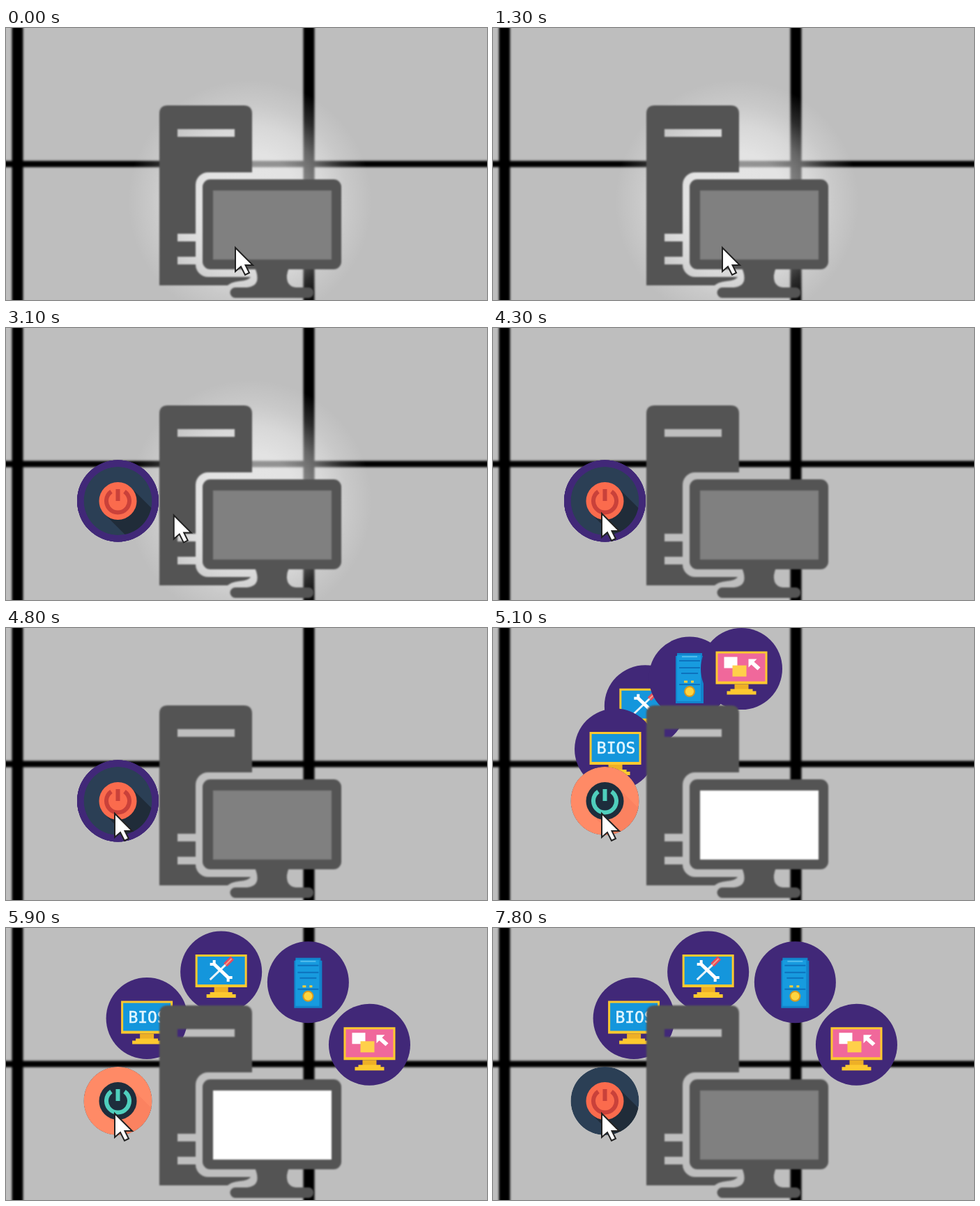
Write an HTML page that moves like this. It is 690 px wide and 390 px high and loops after 8 s.

```html
<!DOCTYPE html>
<html lang="en">
<head>
<meta charset="utf-8">
<title>Radial computer menu</title>
<style>
html, body { margin: 0; width: 100%; height: 100%; overflow: hidden; background: #bebebe; }
svg { display: block; width: 690px; height: 390px; }
text { font: 23px "DejaVu Sans Mono", monospace; fill: #e2f6ff; stroke: #e2f6ff; stroke-width: .6px; }
.soft { filter: blur(1.4px); }
.pc { filter: blur(1px); }
</style>
</head>
<body>
<svg viewBox="0 0 690 390">
  <defs>
    <radialGradient id="halo">
      <stop offset="0" stop-color="#fff" stop-opacity=".6"/>
      <stop offset=".4" stop-color="#fff" stop-opacity=".57"/>
      <stop offset=".62" stop-color="#fff" stop-opacity=".4"/>
      <stop offset=".8" stop-color="#fff" stop-opacity=".17"/>
      <stop offset="1" stop-color="#fff" stop-opacity="0"/>
    </radialGradient>
    <clipPath id="disc"><circle r="49"/></clipPath>
    <mask id="cut" maskUnits="userSpaceOnUse" x="200" y="90" width="300" height="300">
      <path fill="#fff" d="M200 90H500V390H200Z"/>
      <rect x="246" y="145" width="82" height="11"/>
      <rect x="272" y="207" width="219" height="150" rx="18"/>
      <path d="M246 295h30v11h-30zM246 328h30v11h-30zM316 371Q322 364 335 363Q348 362 351 357H370V371Z"/>
    </mask>
    <g id="stand" fill="#fdc92f">
      <path d="M-37-25H37V22H-37Z"/>
      <path fill="#eeb026" d="M-10 22H10V30H-10Z"/>
      <path d="M-16 29H16V32H21V37H-21V32H-16Z"/>
    </g>
    <g id="symbol" fill="none" stroke-width="6">
      <path d="M-9.500-13.500A16.500 16.500 0 1 0 9.500-13.500M0-17V0"/>
    </g>
  </defs>

  <rect width="690" height="390" fill="#bebebe"/>
  <path class="soft" d="M8.500-9H24.500V400H8.500ZM426.500-9H442.500V400H426.500ZM-9 190.500H700V199.500H-9Z"/>
  <circle id="glow" cx="350" cy="249" r="175" fill="url(#halo)"/>

  <g id="items">
    <g data-slot="2">
      <circle r="58.500" fill="#412878"/>
      <use href="#stand"/>
      <path fill="#1496dc" d="M-34-22H34V18H-34Z"/>
      <path stroke="#e9f3f8" stroke-width="3" d="M-16 11L7-11"/>
      <path stroke="#e64a5c" stroke-width="7" d="M6-10L16-20"/>
      <path stroke="#f6a08a" stroke-width="2" d="M6-10L15-19"/>
      <path stroke="#fff" stroke-width="5" d="M-10-11L11 9"/>
      <path fill="none" stroke="#fff" stroke-width="4" d="M-10-17V-11H-16M10 14V8H16"/>
    </g>
    <g data-slot="3">
      <circle r="58.500" fill="#412878"/>
      <path fill="#1283cb" d="M-18-35H18V-31H20V37H-20V-31H-18Z"/>
      <path fill="#179bdf" d="M-18-32H16V34H-18Z"/>
      <path stroke="#0d72bd" stroke-width="2" d="M-15-24H15M-15-14H15M-12-6H12M-15 10H15"/>
      <path stroke="#53bdec" stroke-width="2" d="M-11-30H11"/>
      <path stroke="#f8cf3c" stroke-width="3" d="M-8 6H-3M2 6H6"/>
      <circle cy="20" r="8" fill="#d79a20"/>
      <circle cy="20" r="6" fill="#ffd53f"/>
    </g>
    <g data-slot="4">
      <circle r="58.500" fill="#412878"/>
      <use href="#stand"/>
      <path fill="#f0689b" d="M-34-22H34V18H-34Z"/>
      <path fill="#fff" d="M-25-17H-6V-1H-25ZM10-14H22L18-10L27-2L23 2L14-6L10-2Z"/>
      <path fill="#ffd04a" d="M-13-5H7V11H-13Z"/>
    </g>
    <g data-slot="1">
      <circle r="58.500" fill="#412878"/>
      <use href="#stand"/>
      <path fill="#1496dc" d="M-34-22H34V18H-34Z"/>
      <text x="1" y="6" text-anchor="middle">BIOS</text>
    </g>
    <g data-slot="0">
      <g clip-path="url(#disc)">
        <circle r="49" fill="#2b3f55"/>
        <path fill="#202c39" d="M19-19L60 22V60H22L-19 19Z"/>
      </g>
      <circle r="27" fill="#fb6b4d"/>
      <use href="#symbol" stroke="#c9413a"/>
      <g id="on">
        <g clip-path="url(#disc)">
          <circle r="49" fill="#ff8a66"/>
          <path fill="#fb8260" d="M19-19L60 22V60H22L-19 19Z"/>
        </g>
        <circle r="27" fill="#1d2d3c"/>
        <use href="#symbol" stroke="#4fcfbd"/>
      </g>
    </g>
  </g>

  <g class="pc" fill="#545454">
    <path mask="url(#cut)" d="M220 369V123Q220 111 232 111H341Q353 111 353 123V369Z"/>
    <rect x="282" y="217" width="199" height="129" rx="11"/>
    <path d="M357 344H406Q401 355 404 364Q407 371 416 372H434A7.500 7.500 0 0 1 434 387H329A7.500 7.500 0 0 1 329 372H346Q357 371 360 363Q362 355 357 344Z"/>
    <rect x="297" y="233" width="170" height="99" fill="#808080"/>
    <rect id="screen" x="297" y="233" width="170" height="99" fill="#fff"/>
  </g>
  <path id="cursor" d="M0 1V35L8 28L14 40L20 37L14.500 26H25Z" fill="#fff" stroke="#222" stroke-width="2"/>
</svg>
<script>
const LOOP = 8000, CX = 350, CY = 248, RADIUS = 189.5, STEP = 38.7 * Math.PI / 180;
const byId = id => document.getElementById(id);
const menu = byId('items'), items = [...menu.children];
const glow = byId('glow'), on = byId('on'), display = byId('screen'), cursor = byId('cursor');

const ramp = (t, start, length) => Math.min(1, Math.max(0, (t - start) / length));
const smooth = p => p * p * (3 - 2 * p);
const bez = (s, a, b) => 3 * s * (1 - s) ** 2 * a + 3 * s * s * (1 - s) * b + s ** 3;

// cubic-bezier(.25, .1, .25, 1)
function ease(p) {
  let lo = 0, hi = 1;
  for (let i = 0; i < 20; i++) {
    const mid = (lo + hi) / 2;
    if (bez(mid, .25, .25) < p) lo = mid; else hi = mid;
  }
  return bez(lo, .1, 1);
}

function cursorAt(t) {
  const a = smooth(ramp(t, 1700, 500)), b = smooth(ramp(t, 2400, 1200));
  return [329 + 53 * a - 226 * b, 314 - 31 * a - 18 * (1 - (1 - b) ** 2)];
}

function draw(t) {
  const out = ease(ramp(t, 2000, 800)) * RADIUS;
  const fan = ease(ramp(t, 4826, 800)) * STEP;
  for (const item of items) {
    const angle = item.dataset.slot * fan;
    const x = CX - out * Math.cos(angle), y = CY - out * Math.sin(angle);
    item.setAttribute('transform', `translate(${x} ${y})`);
  }
  menu.setAttribute('opacity', ramp(t, 2000, 120));
  glow.setAttribute('opacity', 1 - ease(ramp(t, 3200, 400)));

  const power = ease(ramp(t, 4810, 250)) - ease(ramp(t, 7200, 300));
  on.setAttribute('opacity', power);
  display.setAttribute('opacity', power);
  cursor.setAttribute('transform', `translate(${cursorAt(t)})`);
}

function tick(now) {
  draw(now % LOOP);
  requestAnimationFrame(tick);
}
draw(0);
requestAnimationFrame(tick);
</script>
</body>
</html>
```
